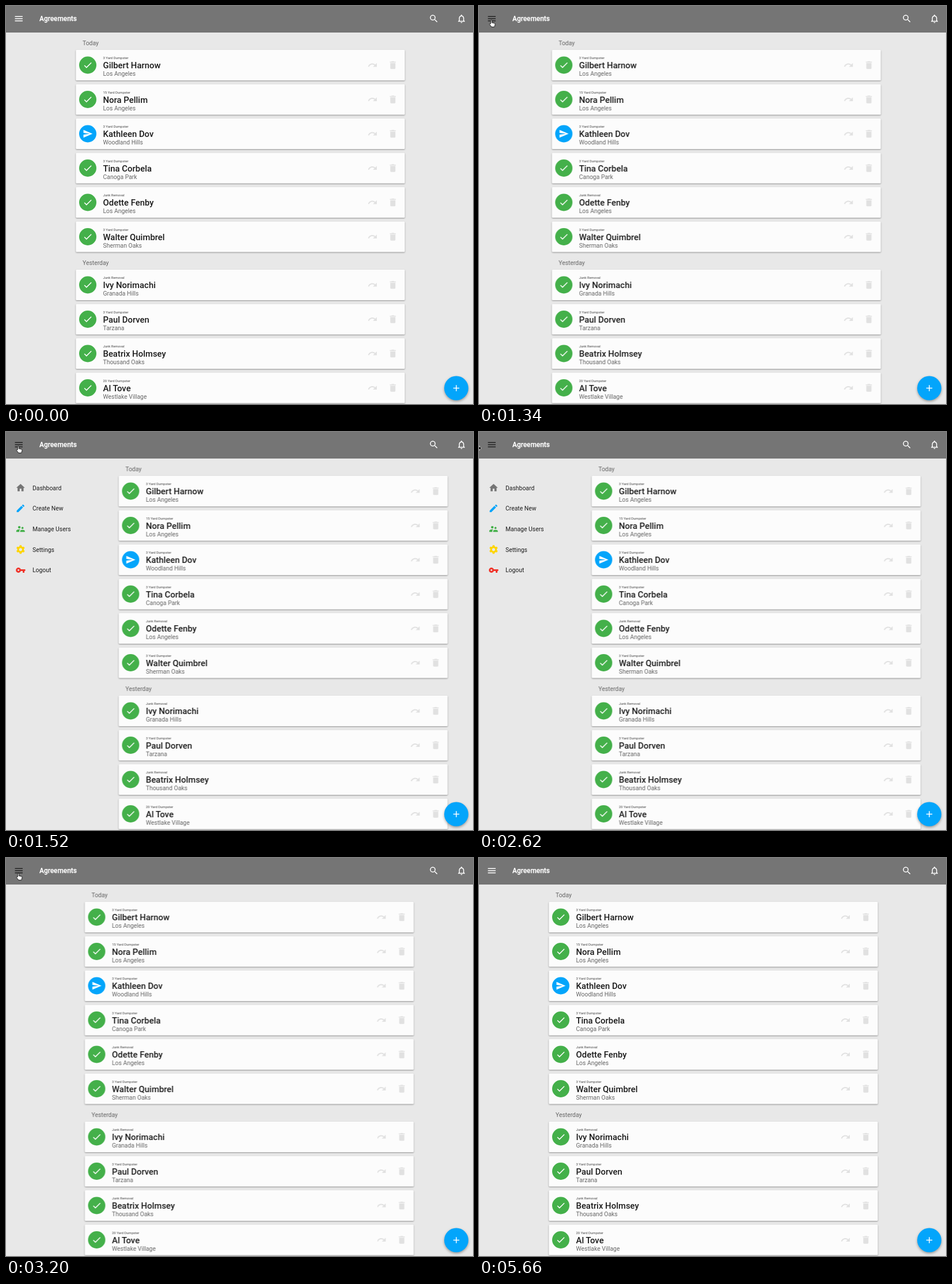
These frames come from a looping animation (811x690 px, 5760 ms). An HTML page:

```html
<!DOCTYPE html>
<html lang="en">
<head>
<meta charset="utf-8">
<title>Agreements</title>
<style>
  html, body { margin: 0; width: 100%; height: 100%; overflow: hidden; background: #e8e8e8; }
  svg { display: block; width: 811px; height: 690px; font-family: Roboto, sans-serif; }
  .card { fill: #fcfcfc; filter: drop-shadow(0 1px 1px rgba(0, 0, 0, .38)); }
  .label { font-size: 10.4px; fill: #666; }
  .tiny { font-size: 5.95px; fill: #444; }
  .name { font-size: 14.88px; font-weight: 500; fill: #1a1a1a; }
  .item { font-size: 10.4px; fill: #1c1c1c; }
  .title { font-size: 11.9px; font-weight: 500; fill: #fff; stroke: #fff; stroke-width: .25px; }
  .fab { fill: #03a5fb; filter: drop-shadow(0 2px 2px rgba(0, 0, 0, .35)); }
  .cursor { stroke: #000; stroke-width: .9; fill: #fff; }
  .edge { fill: #000; stroke: #fff; stroke-width: .7; }
</style>
</head>
<body>
<svg id="stage" viewBox="0 0 811 690" xmlns="http://www.w3.org/2000/svg">
  <g id="menu"></g>
  <g id="content"></g>
  <g id="fab"><circle class="fab" cx="782" cy="662.5" r="21"/></g>
  <rect width="811" height="46" fill="#757575"/>
  <text class="title" x="58" y="26.2">Agreements</text>
  <g id="bar"></g>
  <g id="burger" fill="#fff"></g>
  <path id="edge" class="edge" d="M-5-1.2H-3.6V-4L0 0-3.6 4V1.2H-5z"/>
  <path id="arrow" class="cursor" style="fill:#000;stroke:#fff" d="M0 0V12L2.7 9.6 4.5 13.6 6.4 12.8 4.7 8.9H8.4z"/>
  <path id="hand" class="cursor" d="M2.6 6.8V1.6a1.1 1.1 0 0 1 2.2 0V5l4 .7q1.6.4 1.4 2l-.5 2.6-.9 2H4L1 8.4Q.2 7 1.2 6.6z"/>
</svg>
<script>
const LOOP = 5760;
const GREEN = '#44b04a', BLUE = '#03a5fb', PALE = '#e1e1e1';
const $ = id => document.getElementById(id);

// Icons are drawn on a 24 unit grid.
const ICONS = {
  burger: 'M3 18h18v-2H3v2zm0-5h18v-2H3v2zm0-7v2h18V6H3z',
  check: 'M9 16.17L4.83 12l-1.42 1.41L9 19 21 7l-1.41-1.41z',
  send: 'M2 21L23 12 2 3v7l15 2-15 2z',
  redo: 'M18.4 10.6C16.55 9 14.15 8 11.5 8c-4.65 0-8.58 3.03-9.96 7.22L3.9 16c1.05-3.19 4.05-5.5 7.6-5.5 1.95 0 3.73.72 5.12 1.88L13 16h9V7z',
  trash: 'M6 19c0 1.1.9 2 2 2h8c1.1 0 2-.9 2-2V7H6zM19 4h-3.5l-1-1h-5l-1 1H5v2h14z',
  plus: 'M19 13h-6v6h-2v-6H5v-2h6V5h2v6h6z',
  search: 'M15.5 14h-.79l-.28-.27A6.5 6.5 0 1 0 13.73 14.43l.27.28v.79l5 4.99L20.49 19zm-6 0a4.5 4.5 0 1 1 0-9 4.5 4.5 0 0 1 0 9z',
  bell: 'M12 22c1.1 0 2-.9 2-2h-4c0 1.1.9 2 2 2zm6-6v-5c0-3.07-1.63-5.64-4.5-6.32V4a1.5 1.5 0 0 0-3 0v.68C7.64 5.36 6 7.92 6 11v5l-2 2v1h16v-1zm-2 1H8v-6c0-2.48 1.51-4.5 4-4.5s4 2.02 4 4.5z',
  home: 'M10 20v-6h4v6h5v-8h3L12 3 2 12h3v8z',
  pencil: 'M3 17.25V21h3.75L17.81 9.94l-3.75-3.75zM20.71 7.04a1 1 0 0 0 0-1.41l-2.34-2.34a1 1 0 0 0-1.41 0l-1.83 1.83 3.75 3.75z',
  people: 'M16.5 12a2.5 2.5 0 1 0 0-5 2.5 2.5 0 0 0 0 5zM9 11a3 3 0 1 0 0-6 3 3 0 0 0 0 6zm7.5 3c-1.83 0-5.5.92-5.5 2.75V19h11v-2.25c0-1.83-3.67-2.75-5.5-2.75zM9 13c-2.33 0-7 1.17-7 3.5V19h7v-2.25c0-.85.33-2.34 2.37-3.47A12 12 0 0 0 9 13z',
  key: 'M12.65 10a6 6 0 1 0 0 4H17v4h4v-4h2v-4zM7 14a2 2 0 1 1 0-4 2 2 0 0 1 0 4z'
};

const text = (kind, x, y, s) => `<text class="${kind}" x="${x}" y="${y}">${s}</text>`;
const place = (x, y, inner) =>
  `<g transform="translate(${x} ${y}) scale(.744) translate(-12 -12)">${inner}</g>`;
const icon = (key, x, y, color = 'inherit') =>
  place(x, y, `<path d="${ICONS[key]}" style="fill:${color}"/>`);

function gear(x, y, color) {
  const teeth = Array.from({ length: 6 }, (_, i) =>
    `<path d="M10 2h4l1.2 4.5H8.8z" fill="${color}" transform="rotate(${i * 60} 12 12)"/>`);
  return place(x, y, `<circle cx="12" cy="12" r="5.6" fill="none" stroke="${color}" stroke-width="4.2"/>${teeth.join('')}`);
}

function card(y, [job, name, city], sent) {
  const mid = y + 26.5;
  return `<rect class="card" x="121.3" y="${y}" width="571.3" height="53" rx="1.5"/>` +
    `<circle cx="142" cy="${mid}" r="15" fill="${sent ? BLUE : GREEN}"/>` +
    icon(sent ? 'send' : 'check', 142, mid, '#fff') +
    text('tiny', 168.5, y + 16.2, job) +
    text('name', 168.5, y + 32, name) +
    text('label', 168.5, y + 45.3, city) +
    icon('redo', 636.5, mid, PALE) + icon('trash', 671.8, mid, PALE);
}

const small = '3 Yard Dumpster', junk = 'Junk Removal', LA = 'Los Angeles';
const today = [
  [small, 'Gilbert Harnow', LA],
  ['15 Yard Dumpster', 'Nora Pellim', LA],
  [small, 'Kathleen Dov', 'Woodland Hills'],
  [small, 'Tina Corbela', 'Canoga Park'],
  [junk, 'Odette Fenby', LA],
  [small, 'Walter Quimbrel', 'Sherman Oaks']
];
const yesterday = [
  [junk, 'Ivy Norimachi', 'Granada Hills'],
  [small, 'Paul Dorven', 'Tarzana'],
  [junk, 'Beatrix Holmsey', 'Thousand Oaks'],
  ['20 Yard Dumpster', 'Al Tove', 'Westlake Village']
];

const section = (title, top, rows) => text('label', 133, top - 8.4, title) +
  rows.map((row, i) => card(top + i * 59.5, row, row[2] === 'Woodland Hills')).join('');

$('content').innerHTML = section('Today', 76, today) + section('Yesterday', 457, yesterday);

$('menu').innerHTML = [
  ['Dashboard', 'home', '#757575'],
  ['Create New', 'pencil', BLUE],
  ['Manage Users', 'people', GREEN],
  ['Settings', 'gear', '#ffd500'],
  ['Logout', 'key', '#f0352b']
].map(([label, key, color], i) => {
  const y = 96.7 + i * 35.7;
  return (key === 'gear' ? gear(25.3, y, color) : icon(key, 25.3, y, color)) +
    text('item', 46, y + 3.8, label);
}).join('');

$('bar').innerHTML = icon('search', 743, 22, '#fff') + icon('bell', 791, 22, '#fff');
$('burger').innerHTML = icon('burger', 22.2, 22);
$('fab').innerHTML += icon('plus', 782, 662.5, '#fff');

// Each step is [ms, value]; values hold until the next step.
function hold(id, prop, steps) {
  const frames = steps.map(([ms, value]) => ({ offset: ms / LOOP, [prop]: value, easing: 'step-end' }));
  frames.push({ offset: 1, [prop]: steps[steps.length - 1][1] });
  $(id).animate(frames, { duration: LOOP, iterations: Infinity });
}
const move = (id, steps) => hold(id, 'transform',
  steps.map(([ms, x, y = 0]) => [ms, `translate(${x}px, ${y}px)`]));
const AWAY = -160;

move('content', [[0, 0], [1340, 5.3], [1400, 60], [1520, 74.4], [3150, 68.4], [3200, 15.5], [3350, 0]]);
move('menu', [[0, AWAY], [1400, -40], [1520, 0], [3150, -21], [3200, AWAY]]);
hold('burger', 'fill', [[0, '#fff'], [860, '#222'], [5660, '#fff']]);
move('edge', [[0, AWAY], [590, 3, 57.5], [740, AWAY], [1640, 4.5, 31], [1790, AWAY], [2620, 4, 28], [2680, AWAY]]);
move('arrow', [[0, AWAY], [740, 3, 42], [800, AWAY], [2680, 3, 26], [2740, AWAY]]);
move('hand', [[0, AWAY], [800, 13, 31], [860, 16.5, 26], [920, 17.7, 24], [1640, AWAY],
  [2740, 12, 26.5], [2800, 16, 27], [2850, 17.2, 26.5], [2910, 17.7, 26], [3350, AWAY]]);
</script>
</body>
</html>
```
